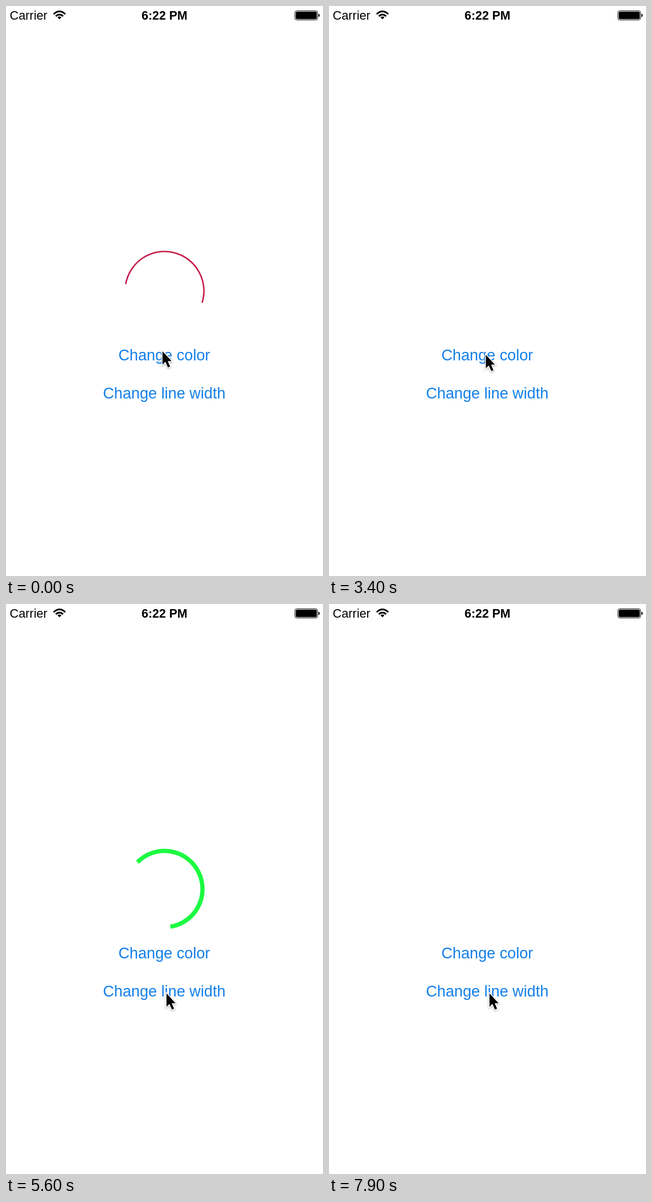
Recreate the animation shown at these times as an HTML page. Size 559 by 1002 pixels, loop 8 s.

```html
<!DOCTYPE html>
<html lang="en">
<head>
<meta charset="utf-8">
<title>Spinner</title>
<style>
  html, body { margin: 0; width: 100%; height: 100%; overflow: hidden; background: #fff; }
  svg { display: block; width: 559px; height: 1002px; }
  text { font-family: "Liberation Sans", Arial, sans-serif; }
  .status { font-size: 21.8px; }
  .clock { font-size: 21.4px; font-weight: bold; text-anchor: middle; }
  .button { font-size: 27.2px; fill: #127fea; text-anchor: middle; }
</style>
</head>
<body>
<svg viewBox="0 0 559 1002">
  <text class="status" x="6.5" y="24">Carrier</text>
  <g fill="none" stroke="#000" stroke-width="2.9">
    <path d="M84 14.2Q94.3 4.8 104.6 14.2"/>
    <path d="M87.8 17.9Q94.3 12 100.8 17.9"/>
    <path d="M90.8 19.8Q94.3 17 97.8 19.8L94.3 23.6Z" fill="#000" stroke="none"/>
  </g>
  <text class="clock" x="279.5" y="24">6:22 PM</text>
  <rect x="509.5" y="8.5" width="40" height="16" rx="3" fill="none" stroke="#000"/>
  <rect x="511" y="10" width="37" height="13" rx="1.8"/>
  <path d="M551 13.5Q553.2 14.2 553.2 16.5T551 19.5Z"/>

  <path id="arc" fill="none"/>
  <text class="button" x="279" y="622.5">Change color</text>
  <text class="button" x="279" y="690">Change line width</text>
  <g id="cursor">
    <path d="M0 0V23.5L5.2 18.6L9.6 28.5L13.4 26.8L9.2 17.2H16Z" stroke="#fff" stroke-width="3"
      paint-order="stroke" style="filter: drop-shadow(0 1.5px 1.5px rgba(0,0,0,.35))"/>
  </g>
</svg>
<script>
  const LOOP = 8, STEP = 100;
  const CENTER = { x: 279.5, y: 501 }, OUTER_RADIUS = 70.8;
  const arc = document.getElementById('arc');
  const cursor = document.getElementById('cursor');

  const clamp = v => Math.min(1, Math.max(0, v));
  const mix = (a, b, k) => a + (b - a) * k;

  // cubic-bezier(.42, 0, .58, 1)
  function easeInOut(x) {
    if (x <= 0 || x >= 1) return clamp(x);
    let lo = 0, hi = 1;
    for (let i = 0; i < 24; i++) {
      const s = (lo + hi) / 2, r = 1 - s;
      if (1.26 * s * r * r + 1.74 * s * s * r + s ** 3 < x) lo = s; else hi = s;
    }
    return lo * lo * (3 - 2 * lo);
  }

  function pointAt(degrees, radius) {
    const a = degrees * Math.PI / 180;
    return `${CENTER.x + radius * Math.cos(a)} ${CENTER.y + radius * Math.sin(a)}`;
  }

  function drawSpinner(t) {
    // The spinner begins slightly ahead and settles to an even pace.
    const time = t + 0.1 * (1 - clamp(t / 1.3));
    const phase = (time + 1.092) % 1.5;
    const grow = easeInOut(phase);
    const shrink = easeInOut((phase - 1) / 0.5);
    const turn = 8.3 + 90 * time;
    const from = turn + 360 * (0.25 * grow + 0.75 * shrink);
    const to = turn + 360 * grow;
    const width = t < 4.4 ? 2.6 : t < 5.4 ? 5.3 : 7.6;
    const radius = OUTER_RADIUS - width / 2;
    const large = to - from > 180 ? 1 : 0;

    arc.setAttribute('d', to - from < 1 ? '' :
      `M${pointAt(from, radius)}A${radius} ${radius} 0 ${large} 1 ${pointAt(to, radius)}`);
    arc.setAttribute('stroke', t < 0.6 ? '#c41e4c' : t < 2.9 ? '#a0aa46' : '#1cfa42');
    arc.setAttribute('stroke-width', width);
  }

  function drawCursor(t) {
    const k = easeInOut(t - 3.2);
    cursor.setAttribute('transform', `translate(${mix(276, 283, k)} ${mix(607, 684.5, k)})`);
  }

  function frame(now) {
    const t = Math.floor(now / STEP) * STEP / 1000 % LOOP;
    drawSpinner(t);
    drawCursor(t);
    requestAnimationFrame(frame);
  }
  frame(0);
</script>
</body>
</html>
```
